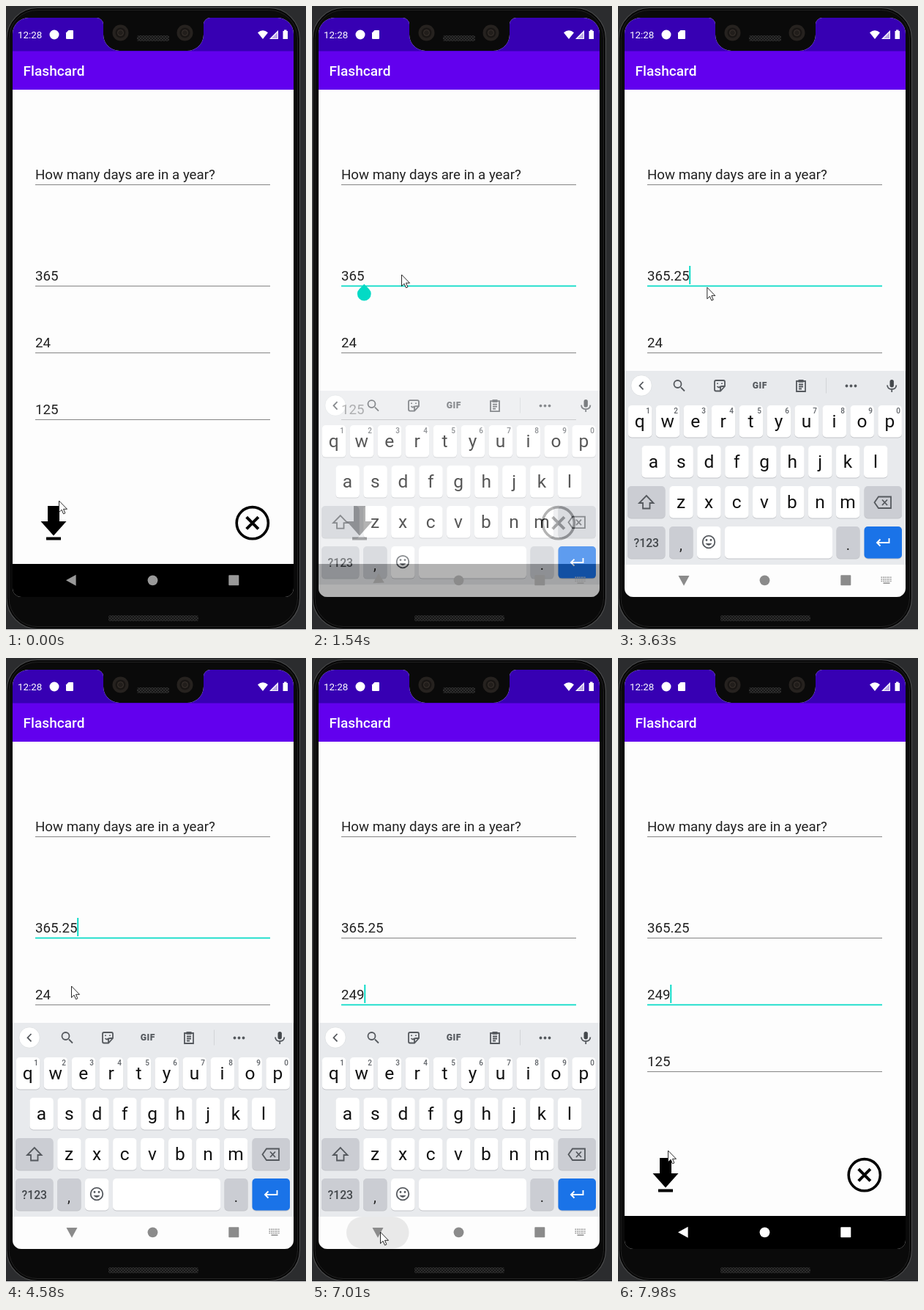
An HTML page for the animation above (8 s loop, 410 px wide and 850 px high).

```html
<!DOCTYPE html>
<html lang="en">
<head>
<meta charset="utf-8">
<title>Flashcard editor</title>
<style>
html, body { margin: 0; width: 100%; height: 100%; overflow: hidden; background: #2b2c2e; }
svg { display: block; width: 410px; height: 850px; }
text { font-family: Roboto, "Noto Sans", sans-serif; white-space: pre; }
.field { font-size: 18.7px; fill: #212121; }
.key { font-size: 24.5px; fill: #111; text-anchor: middle; }
.hint { font-size: 10px; font-weight: 500; fill: #5f6368; text-anchor: middle; }
.tool { fill: none; stroke: #55595e; stroke-width: 1.8; }
</style>
</head>
<body>
<svg id="stage" viewBox="0 0 410 850"></svg>
<script>
const LOOP = 8000;
const STEP = 130;    // the pointer is redrawn at this interval
const BLINK = 495;
const LEFT = 40;
const TEAL = '#03dac5';
const stage = document.getElementById('stage');
const $ = id => document.getElementById(id);

const rect = (x, y, w, h, fill, r = 0, more = '') =>
  `<rect x="${x}" y="${y}" width="${w}" height="${h}" rx="${r}" fill="${fill}" ${more}/>`;
const disc = (x, y, r, fill, more = '') =>
  `<circle cx="${x}" cy="${y}" r="${r}" fill="${fill}" ${more}/>`;
const path = (d, more = '') => `<path d="${d}" ${more}/>`;
const text = (x, y, s, more = '') => `<text x="${x}" y="${y}" ${more}>${s}</text>`;
const times = (n, make) => Array.from({ length: n }, (_, i) => make(i)).join('');

const SCREEN = 'M9 38A22 22 0 0 1 31 16H124A9 9 0 0 1 133 25V39A22 22 0 0 0 155 61H248' +
  'A22 22 0 0 0 270 39V25A9 9 0 0 1 279 16H371A22 22 0 0 1 393 38V793' +
  'A12 12 0 0 1 381 805H21A12 12 0 0 1 9 793Z';

function device() {
  const lens = x => disc(x, 36.5, 11, '#26221f') + disc(x, 36.5, 7, '#191614') +
    disc(x, 36.5, 4, '#221e1b', 'stroke="#3b342f"');
  const grill = (x, y, w, h) => rect(x, y, w, h, '#161616', 2.5) + rect(x, y, w, h, 'url(#mesh)', 2.5);
  return rect(0, 0, 410, 850, '#2b2c2e') + rect(0, 849, 410, 1, '#e4e4e4') +
    rect(1, 2.5, 400.5, 846, '#060606', 42, 'stroke="#4a4b4c" stroke-width="1.2"') +
    rect(4, 5.5, 394.5, 840, '#0a0a0a', 39, 'stroke="#222" stroke-width="1"') +
    lens(156.5) + lens(244.5) + grill(179, 40, 44, 8) + grill(140, 830, 123, 8);
}

function statusBar() {
  return rect(9, 16, 384, 46, '#3700b3') +
    text(16, 44, '12:28', 'font-size="13.4" fill="#fff"') +
    '<g fill="#fff">' + disc(66, 39, 6.5, '#fff') +
    path('M85.5 33H91Q92 33 92 34V44Q92 45 91 45H83Q82 45 82 44V36.5Z') +
    path('M344 36.2Q351 30.5 358 36.2L351 45Z') +
    path('M372 33V45H360Z') + path('M371 36V44H363Z', 'fill="#3700b3" opacity=".35"') +
    path('M380 32.5H383.5V34H385V45H378.5V34H380Z') + '</g>';
}

function fields() {
  const entry = (y, s, id) => text(LEFT, y - 7.5, s, `class="field" id="text${id}"`) +
    rect(40, y - .5, 321, 1, '#858585') +
    rect(40, y - .9, 321, 1.7, TEAL, 0, `id="focus${id}" opacity="0"`);
  return entry(243.5, 'How many days are in a year?', 0) +
    ['365', '24', '125'].map((s, i) => entry(381.5 + i * 91, s, i + 1)).join('');
}

function buttons() {
  return path('M57 681H73V702H82.5L65 721.5L47.5 702H57ZM55 723.5H75V727.5H55Z') +
    disc(336.8, 704.2, 21.6, 'none', 'stroke="#000" stroke-width="3.6"') +
    path('M328.7 696.2L344.9 712.4M344.9 696.2L328.7 712.4', 'stroke="#000" stroke-width="4"');
}

function toolbar() {
  return disc(32, 517, 14.2, '#fff', 'stroke="#d9dbde" stroke-width=".7"') +
    '<g class="tool">' + path('M34.5 512L29.5 517.2L34.5 522.4') +
    path('M86 519.5L91 524.5') + '<circle cx="81.5" cy="515" r="5"/>' +
    path('M134 510H144Q146 510 146 512V518L140 524.5H134Q132 524.5 132 522.5V512Q132 510 134 510Z' +
      'M146 518H142Q140 518 140 520V524.5M135.5 518Q138 521 140 518M136 513.5V515M142 513.5V515') +
    path('M244 511H256V525H244ZM247 515.5H253M247 518.5H253M247 521.5H251') +
    path('M368 516.5Q368.5 522 374.2 522Q380 522 380.4 516.5M374.2 522V526') + '</g>' +
    rect(246.5, 509, 7, 3.8, '#55595e') + rect(371.5, 509, 5.4, 10.5, '#44484c', 2.7) +
    text(193.8, 521.3, 'GIF', 'font-size="12.2" font-weight="900" text-anchor="middle" fill="#55595e" letter-spacing=".5"') +
    rect(284, 506.5, 1, 21, '#d2d4d7') + times(3, i => disc(312.5 + i * 6, 517.5, 1.9, '#55595e'));
}

function keyboard() {
  const GREY = '#cbcdd3';
  const cap = (x, y, w, fill = '#fff') => rect(x, y + 1, w, 43.5, '#c3c5c9', 5) + rect(x, y, w, 43.5, fill, 5);
  const row = (letters, first, y) => [...letters].map((c, i) => {
    const x = first + i * 37.95;
    return cap(x - 16, y, 32.5) + text(x, y + 29.5, c, 'class="key"');
  }).join('');
  return rect(9, 497, 384, 266, '#e8eaed') + rect(9, 761, 384, 44, '#fdfdfd') + toolbar() +
    row('qwertyuiop', 29.8, 544) + times(10, i => text(41 + i * 38, 555, (i + 1) % 10, 'class="hint"')) +
    row('asdfghjkl', 48.4, 599) + row('zxcvbnm', 86.2, 654) +
    cap(13, 654, 51.5, GREY) + cap(336.5, 654, 51.5, GREY) +
    path('M38.8 667L48.5 677H43.5V684.5H34V677H29Z', 'class="tool"') +
    path('M356 668.5H373V684H356L350.5 676.2ZM361 672.5L368 680M368 672.5L361 680', 'class="tool"') +
    cap(13, 709, 51.5, GREY) +
    text(38.8, 736.5, '?123', 'font-size="15.8" font-weight="500" text-anchor="middle" fill="#44484c"') +
    cap(70, 709, 32.5, GREY) + text(86, 741, ',', 'font-size="20" text-anchor="middle" fill="#222"') +
    cap(108, 709, 32.5) + '<circle class="tool" cx="124" cy="730" r="8.3"/>' +
    path('M119.5 732Q124 738 128.5 732Z', 'fill="#55595e"') +
    disc(121, 727.5, 1.4, '#55595e') + disc(127, 727.5, 1.4, '#55595e') +
    cap(146, 709, 147) + cap(298.5, 709, 32, GREY) +
    text(314.5, 741, '.', 'font-size="20" text-anchor="middle" fill="#222"') +
    cap(336.5, 709, 51.5, '#1a73e8') +
    path('M370.5 725V731H354M358.5 726.5L354 731L358.5 735.5', 'fill="none" stroke="#fff" stroke-width="1.9"');
}

function navIcons() {
  const dots = times(18, i =>
    rect(359.5 + i % 6 * 2.5, 777.5 + Math.floor(i / 6) * 2.6, 1.5, 1.5, '#8c8c8c'));
  return rect(47, 761, 85.5, 43.5, '#000', 21.7, 'id="ripple" opacity="0"') +
    '<g id="nav">' + path('M82 782.3L95.6 774.8V789.8Z', 'id="back"') +
    '<circle cx="200.5" cy="782.3" r="6.9"/><rect x="304.3" y="775.3" width="14" height="14" rx=".8"/></g>' +
    `<g id="ime">${dots}${rect(362.5, 785.4, 9, 1.5, '#8c8c8c')}</g>`;
}

stage.innerHTML =
  `<defs><clipPath id="screen"><path d="${SCREEN}"/></clipPath>
   <pattern id="mesh" width="4" height="4" patternUnits="userSpaceOnUse">
   <path d="M0 4L4 0M0 0L4 4" stroke="#333" stroke-width=".8"/></pattern></defs>` +
  device() +
  '<g clip-path="url(#screen)">' +
  rect(9, 16, 384, 790, '#fdfdfd') + statusBar() + rect(9, 61.5, 384, 52.5, '#6200ee') +
  text(23.6, 95, 'Flashcard', 'font-size="19.1" font-weight="500" fill="#fff"') +
  fields() + buttons() + rect(9, 760, 384, 46, '#000') +
  rect(0, 0, 1.9, 25, TEAL, 0, 'id="caret"') +
  path('M0 -13.2L6.6 -6.6A9.4 9.4 0 1 1 -6.6 -6.6Z', `id="handle" fill="${TEAL}"`) +
  `<g id="board">${keyboard()}</g>` + navIcons() + '</g>' +
  path('M0 0V15.6L3.6 12.2L6 17.8L8.4 16.8L6 11.3H11Z',
    'id="mouse" fill="#fff" stroke="#111" stroke-width=".9" stroke-linejoin="round"');

const ramp = (t, from, length) => Math.min(1, Math.max(0, (t - from) / length));
const pulse = (t, on, off, fade) => ramp(t, on, fade) * (1 - ramp(t, off, fade));
const easeIn = p => p * p;
const easeOut = p => 1 - (1 - p) ** 2;
const set = (id, name, value) => $(id).setAttribute(name, value);
const move = (id, x, y) => set(id, 'transform', `translate(${x} ${y})`);

// Pointer legs: start time, steps, end point, easing
const legs = [
  [120, 5, 122.5, 366, easeOut], [3630, 4, 112, 643, easeIn], [4160, 3, 89.5, 457, easeOut],
  [4580, 1, 89.5, 447, easeOut], [4700, 1, 89.5, 459, easeOut], [6270, 2, 86.5, 772, easeIn],
  [6530, 2, 90, 807, easeOut], [6770, 2, 93.5, 782, easeOut], [7280, 5, 80, 564, easeIn],
  [7980, 1, 68.5, 671, easeOut]
];

function pointer(t) {
  let x = 72.5, y = 674;
  for (const [start, steps, endX, endY, ease] of legs) {
    if (t < start) break;
    const p = ease(Math.min(1, (Math.floor((t - start) / STEP) + 1) / steps));
    x += (endX - x) * p;
    y += (endY - y) * p;
  }
  return [x, y];
}

const keyTimes = [1940, 2890, 3190];
const caretResets = [870, 3190, 4965, 6000];

function draw(t) {
  move('mouse', ...pointer(t));
  $('text1').textContent = '365.25'.slice(0, 3 + keyTimes.filter(k => k <= t).length);
  $('text2').textContent = '249'.slice(0, t < 6000 ? 2 : 3);

  const second = t >= 4965;
  const line = second ? 472.5 : 381.5;
  set('focus1', 'opacity', pulse(t, 700, 4780, 150));
  set('focus2', 'opacity', ramp(t, 4780, 150));

  const reset = caretResets.findLast(r => r <= t);
  const lit = reset && Math.floor((t - reset) / BLINK) % 2 === 0;
  move('caret', LEFT + $(second ? 'text2' : 'text1').getComputedTextLength() - .2, line - 27.5);
  set('caret', 'opacity', lit ? 1 : 0);

  move('handle', second ? 61 : 71.3, line + 10.5);
  set('handle', 'opacity', pulse(t, 1000, 1900, 150) + pulse(t, 5030, 5980, 150));

  const up = pulse(t, 1330, 7120, 300);
  move('board', 0, 308 * (1 - up) ** 2);
  set('board', 'opacity', up);
  set('back', 'transform', `rotate(${-90 * up ** 3} 89.7 782)`);
  set('ime', 'opacity', pulse(t, 970, 7200, 150));
  set('ripple', 'opacity', .08 * pulse(t, 6830, 7080, 180));
  set('nav', 'fill', t > 7350 ? '#fff' : up > .5 ? '#8b8b8b' : '#999');
}

const start = performance.now();
function tick() {
  draw((performance.now() - start) % LOOP);
  requestAnimationFrame(tick);
}
tick();
</script>
</body>
</html>
```
